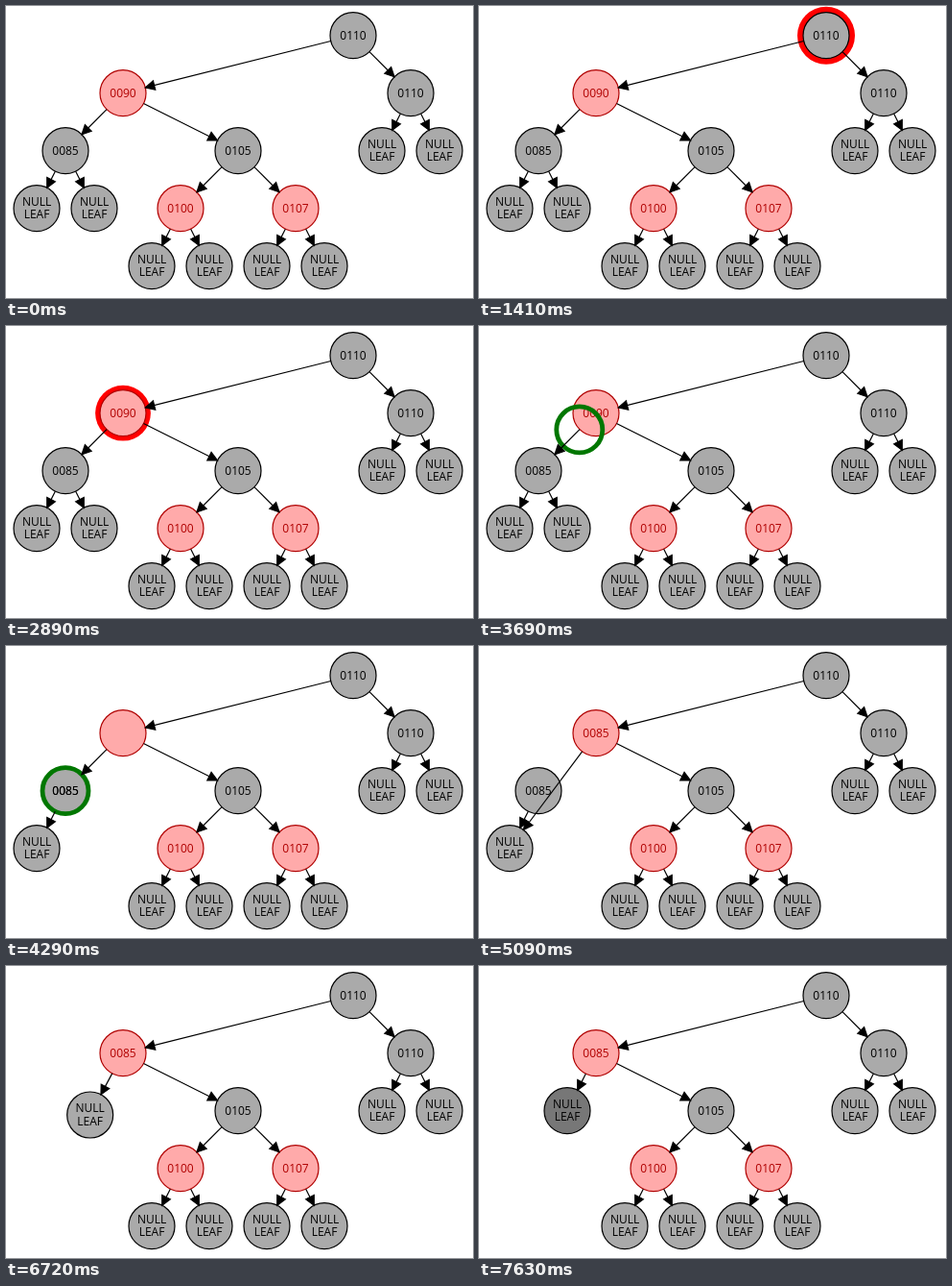
Write an HTML page with a canvas that moves like this. It is 487 px wide and 304 px high and loops after 8000 ms.

```html
<!DOCTYPE html>
<html lang="en">
<head>
<meta charset="utf-8">
<title>Red-black tree deletion</title>
<style>
  html, body { margin: 0; width: 100%; height: 100%; overflow: hidden; background: #fff; }
  canvas { display: block; width: 487px; height: 304px; filter: blur(0.45px); }
</style>
</head>
<body>
<canvas id="stage"></canvas>
<script>
const W = 487, H = 304, LOOP = 8000, R = 24;
const BLACK = { line: '#000', fill: '#aaa' };
const RED = { line: '#b00000', fill: '#faa' };
const DOUBLE = { line: '#000', fill: '#777' };

const canvas = document.getElementById('stage');
const ctx = canvas.getContext('2d');
const dpr = window.devicePixelRatio || 1;
canvas.width = Math.round(W * dpr);
canvas.height = Math.round(H * dpr);
ctx.scale(dpr, dpr);
ctx.font = '12px "Open Sans", "Noto Sans", sans-serif';
ctx.textAlign = 'center';

const at = (x, level) => ({ x, y: 30.7 + 60 * level });
const node = (x, level, text, style = BLACK) => ({ ...at(x, level), text, style });
const leaf = (x, level) => node(x, level, 'NULL LEAF');
const during = (t, from, to) => t >= from && t < to;
const progress = (t, from, to) => Math.min(1, Math.max(0, (t - from) / (to - from)));
const mix = (a, b, p) => ({ x: a.x + (b.x - a.x) * p, y: a.y + (b.y - a.y) * p });

const root = node(362, 0, '0110');
const target = node(122, 1, '0090', RED);
const right = node(422, 1, '0110');
const pred = node(62, 2, '0085');
const mid = node(242, 2, '0105');
const n100 = node(182, 3, '0100', RED);
const n107 = node(302, 3, '0107', RED);
const predLeft = leaf(32, 3);
const predRight = leaf(92, 3);
const leafFrom = at(32, 3), leafTo = at(92, 2);

const fixedNodes = [root, target, right, mid, n100, n107];
const fixedEdges = [[root, target], [root, right], [target, mid], [mid, n100], [mid, n107]];
for (const [parent, x, level] of [[right, 392, 2], [right, 452, 2], [n100, 152, 4],
                                  [n100, 212, 4], [n107, 272, 4], [n107, 332, 4]]) {
  const child = leaf(x, level);
  fixedNodes.push(child);
  fixedEdges.push([parent, child]);
}

function disc(p, r) {
  ctx.beginPath();
  ctx.arc(p.x, p.y, r, 0, 2 * Math.PI);
}

function write(text, p, color) {
  const lines = text.split(' ');
  ctx.fillStyle = color;
  lines.forEach((line, i) => {
    ctx.fillText(line, p.x, p.y + 4 + (i - (lines.length - 1) / 2) * 13.4);
  });
}

function drawNode(n) {
  disc(n, R);
  ctx.fillStyle = n.style.fill;
  ctx.fill();
  ctx.lineWidth = 1.2;
  ctx.strokeStyle = n.style.line;
  ctx.stroke();
  write(n.text, n, n.style.line);
}

function drawEdge([a, b]) {
  const d = Math.hypot(b.x - a.x, b.y - a.y);
  const ux = (b.x - a.x) / d, uy = (b.y - a.y) / d;
  const tip = { x: b.x - ux * R, y: b.y - uy * R };
  ctx.strokeStyle = ctx.fillStyle = '#000';
  ctx.lineWidth = 1.2;
  ctx.beginPath();
  ctx.moveTo(a.x + ux * R, a.y + uy * R);
  ctx.lineTo(tip.x, tip.y);
  ctx.stroke();
  const bx = tip.x - ux * 9.6, by = tip.y - uy * 9.6;
  ctx.beginPath();
  ctx.moveTo(tip.x, tip.y);
  ctx.lineTo(bx - uy * 4.8, by + ux * 4.8);
  ctx.lineTo(bx + uy * 4.8, by - ux * 4.8);
  ctx.closePath();
  ctx.fill();
  ctx.stroke();
}

// Red halo whose radius follows a triangle wave.
function drawHalo(p, t) {
  const phase = (t - 912) / 588;
  disc(p, 30.8 - 5.2 * Math.abs(phase - Math.round(phase)));
  ctx.fillStyle = '#f00';
  ctx.fill();
}

function drawRing(p) {
  disc(p, R);
  ctx.lineWidth = 4.8;
  ctx.strokeStyle = '#070';
  ctx.stroke();
}

function draw(t) {
  const copying = during(t, 4290, 5090);
  const relinked = t >= 5090, removed = t >= 5960;

  target.text = relinked ? '0085' : copying ? '' : '0090';
  Object.assign(predLeft, mix(leafFrom, leafTo, progress(t, 5960, 6780)));
  predLeft.style = t >= 7630 ? DOUBLE : BLACK;

  const nodes = [...fixedNodes, predLeft];
  const edges = [...fixedEdges, [relinked ? target : pred, predLeft]];
  if (!relinked) edges.push([target, pred]);
  if (!removed) nodes.push(pred);
  if (relinked && !removed) edges.push([pred, predLeft]);
  if (t < 4290) {
    nodes.push(predRight);
    edges.push([pred, predRight]);
  }

  ctx.fillStyle = '#fff';
  ctx.fillRect(0, 0, W, H);
  if (during(t, 970, 1810)) drawHalo(root, t);
  if (during(t, 2650, 3450)) drawHalo(target, t);
  nodes.forEach(drawNode);
  if (during(t, 1810, 2650)) drawRing(mix(root, target, progress(t, 1800, 2610)));
  if (during(t, 3450, 5090)) drawRing(mix(target, pred, progress(t, 3450, 4290)));
  if (copying) write('0085', mix(pred, target, progress(t, 4290, 5100)), '#000');
  edges.forEach(drawEdge);
}

const start = performance.now();
function tick() {
  draw((performance.now() - start) % LOOP);
  requestAnimationFrame(tick);
}
tick();
</script>
</body>
</html>
```
